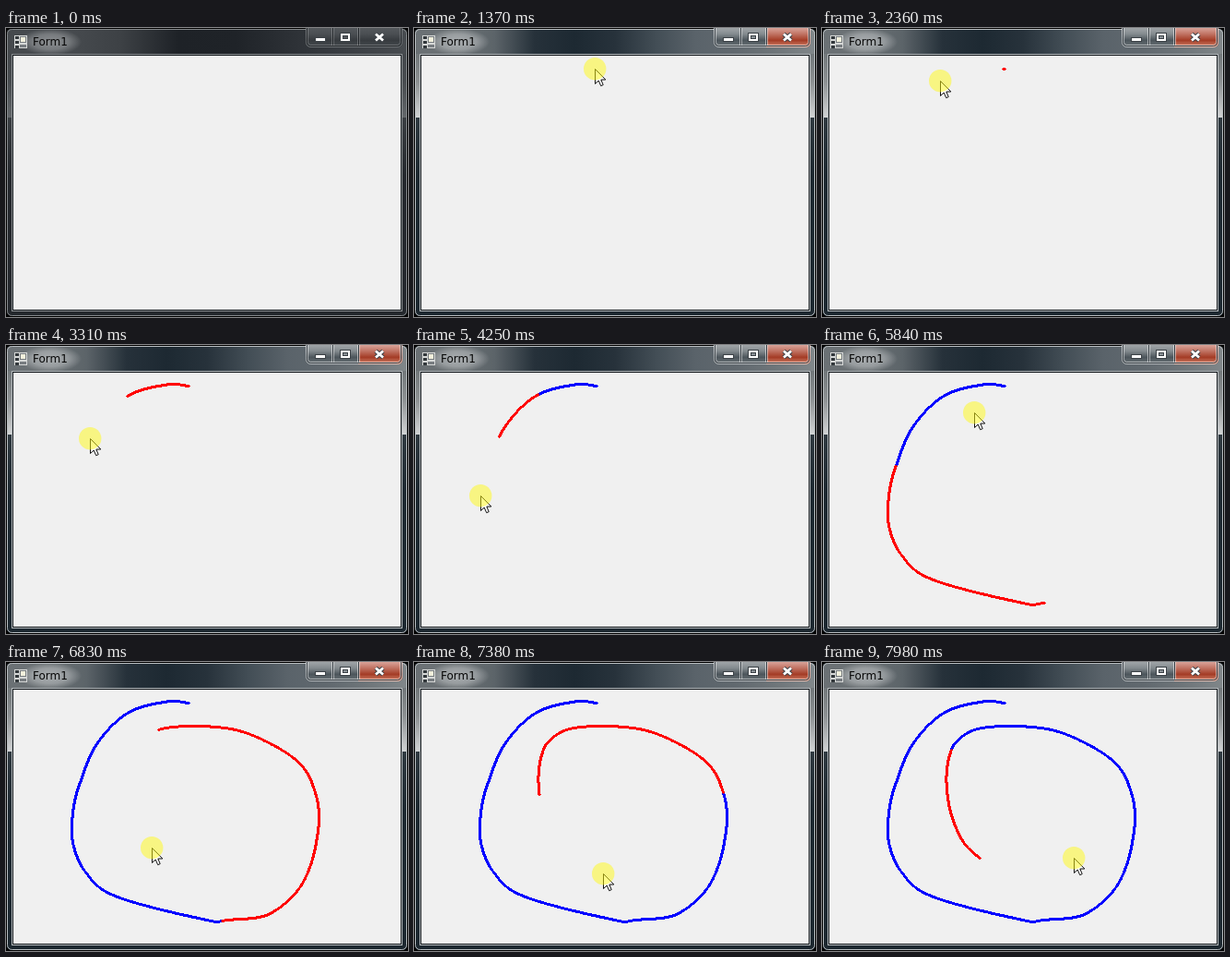
An HTML page with a canvas for the animation above (8 s loop, 436 by 313 pixels).

```html
<!DOCTYPE html>
<html lang="en">
<head>
<meta charset="utf-8">
<title>Form1</title>
<style>
html, body { margin: 0; width: 100%; height: 100%; overflow: hidden; background: #000; }
canvas { display: block; width: 436px; height: 313px; }
</style>
</head>
<body>
<canvas id="stage" width="436" height="313"></canvas>
<script>
const W = 436, H = 313, LOOP = 8000;
const ENTER = 120, SETTLE = 680, PRESS = 1140;
const RED_DELAY = 990, BLUE_DELAY = 2000;
const ctx = document.getElementById('stage').getContext('2d');

// Key points of the mouse drag: time, x, y
const keys = [
  [1340, 198, 44], [1650, 177, 42], [2280, 133, 54], [3020, 99, 87],
  [3840, 80, 130], [4250, 72, 163], [4370, 72, 195], [4480, 85, 226],
  [4620, 118, 253], [4800, 222, 280], [4850, 240, 279], [4920, 284, 273],
  [5020, 320, 241], [5220, 338, 182], [5400, 334, 138], [5550, 312, 104],
  [5660, 259, 76], [5750, 210, 69], [5840, 165, 73], [5980, 140, 94],
  [6470, 137, 153], [6830, 158, 201], [7500, 217, 231], [7980, 273, 212]
];
const last = keys.length - 1;

function slope(i, axis) {
  const a = keys[Math.max(0, i - 1)], b = keys[Math.min(last, i + 1)];
  return (b[axis] - a[axis]) / (b[0] - a[0]);
}

// Cubic Hermite through the key points
function dragAt(t) {
  t = Math.min(Math.max(t, keys[0][0]), keys[last][0]);
  let i = 0;
  while (keys[i + 1][0] < t) i++;
  const a = keys[i], b = keys[i + 1], d = b[0] - a[0], u = (t - a[0]) / d;
  const u2 = u * u, u3 = u2 * u, mix = 3 * u2 - 2 * u3;
  return [1, 2].map(k =>
    a[k] + (b[k] - a[k]) * mix +
    d * ((u3 - 2 * u2 + u) * slope(i, k) + (u3 - u2) * slope(i + 1, k)));
}

function cursorAt(t) {
  if (t >= PRESS) return dragAt(t);
  const u = Math.min(1, (t - ENTER) / (SETTLE - ENTER));
  const e = u * (2 - u);
  return [349 - 149 * e, 303 - 259 * e];
}

// Distinct pixels visited by the drag, with their times
const trail = [];
for (let t = keys[0][0]; t <= LOOP - RED_DELAY; t++) {
  const [x, y] = dragAt(t).map(Math.round), p = trail[trail.length - 1];
  if (!p || p.x !== x || p.y !== y) trail.push({ t, x, y });
}

// Evenly spaced colours along a line
function gradient(c, x0, y0, x1, y1, ...colors) {
  const g = c.createLinearGradient(x0, y0, x1, y1);
  colors.forEach((color, i) => g.addColorStop(i / (colors.length - 1), color));
  return g;
}

function roundRect(c, x, y, w, h, r) {
  c.beginPath();
  c.roundRect(x, y, w, h, r);
}

function drawGlass(c, active) {
  const base = active ? '#1d2830' : '#24282d';
  c.fillStyle = base;
  c.fillRect(1, 1, W - 2, H - 2);

  c.fillStyle = active
    ? gradient(c, 0, 0, W, 0, '#6a7074', '#6c7275', '#5c6469', '#26313a', '#1d2932',
      '#27323b', '#424d55', '#5a636a', '#61696f', '#6f767a', '#81878a')
    : gradient(c, 0, 0, W, 0, '#45494d', '#484c50', '#3d4145', '#1e2227', '#1f2328',
      '#2d3136', '#3b3f44', '#484c50');
  c.fillRect(1, 1, W - 2, 28);

  const upper = active
    ? gradient(c, 0, 20, 0, 97, '#6b7174', '#8d9193', '#d2d4d5')
    : gradient(c, 0, 20, 0, 97, '#43474b', '#484c50', '#64686b');
  const lower = gradient(c, 0, 97, 0, 160, active ? '#303a41' : '#3b3f43', base);
  for (const x of [1, 429]) {
    c.fillStyle = upper;
    c.fillRect(x, 28, 6, 69);
    c.fillStyle = lower;
    c.fillRect(x, 97, 6, 63);
  }

  // Soft glow behind the title
  c.save();
  c.translate(48, 15);
  c.scale(1, .42);
  const glow = c.createRadialGradient(0, 0, 6, 0, 0, 34);
  const tint = active ? '205,208,210' : '175,178,180';
  [.6, .45, 0].forEach((alpha, i) => glow.addColorStop(i / 2, `rgba(${tint},${alpha})`));
  c.fillStyle = glow;
  c.fillRect(-40, -32, 80, 64);
  c.restore();
}

function drawIcon(c) {
  c.fillStyle = '#d5d7d6';
  c.fillRect(9, 8, 14, 14);
  c.fillStyle = '#33383c';
  for (const y of [9, 14, 19]) c.fillRect(10, y, 4, 3);
  c.fillStyle = '#777c80';
  c.fillRect(15, 9, 7, 7);
  c.fillRect(15, 18, 7, 3);
  c.fillStyle = '#f3f0dc';
  c.fillRect(16, 10, 5, 5);
}

function drawButtons(c, active) {
  const dark = active ? '#343c42' : '#1f2327';
  const light = active ? 'rgba(255,255,255,.5)' : 'rgba(255,255,255,.22)';
  c.save();
  roundRect(c, 325, -4, 105, 25, 5);
  c.clip();
  c.fillStyle = active
    ? gradient(c, 0, 0, 0, 20, '#a0a5a8', '#838a8e', '#4c555b', '#6b7378')
    : gradient(c, 0, 0, 0, 20, '#54585c', '#4a4e52', '#373b3f', '#454a4e');
  c.fillRect(325, 0, 57, 21);
  if (active) c.fillStyle = gradient(c, 0, 0, 0, 20, '#d9a399', '#c07262', '#a43c26', '#cf8068');
  c.fillRect(382, 0, 48, 21);
  for (const x of [354, 382]) {
    c.fillStyle = light;
    c.fillRect(x - 1, 0, 3, 20);
    c.fillStyle = dark;
    c.fillRect(x, 0, 1, 20);
  }
  c.restore();

  // Nested rims: light, dark, light
  c.lineWidth = 1;
  [light, dark, light].forEach((color, i) => {
    c.strokeStyle = color;
    roundRect(c, 325.5 + i, -4.5, 104 - 2 * i, 25 - i, 5 - i);
    c.stroke();
  });

  const ink = '#3c4247';
  c.fillStyle = ink;
  c.fillRect(335, 10, 12, 5);
  c.fillRect(362, 5, 12, 10);
  c.fillStyle = '#fff';
  c.fillRect(336, 11, 10, 3);
  c.fillRect(363, 6, 10, 8);
  c.fillStyle = ink;
  c.fillRect(365, 8, 6, 4);
  c.fillStyle = active ? '#8a9196' : '#55595d';
  c.fillRect(366, 9, 4, 2);

  for (const [color, width] of [[ink, 4.8], ['#fff', 2.8]]) {
    c.strokeStyle = color;
    c.lineWidth = width;
    c.beginPath();
    for (const s of [-1, 1]) {
      c.moveTo(405 - 4 * s, 6.5);
      c.lineTo(405 + 4 * s, 13.5);
    }
    c.stroke();
  }
}

function makeWindow(active) {
  const layer = document.createElement('canvas');
  layer.width = W;
  layer.height = H;
  const c = layer.getContext('2d');
  c.fillStyle = '#000';
  c.fillRect(0, 0, W, H);
  c.save();
  roundRect(c, 0.5, 0.5, W - 1, H - 1, 6);
  c.clip();
  drawGlass(c, active);
  c.restore();

  c.lineWidth = 1;
  c.strokeStyle = active ? '#b9bec1' : '#85898c';
  roundRect(c, 1.5, 1.5, W - 3, H - 3, 5);
  c.stroke();
  c.strokeStyle = active ? '#b5babd' : '#8b8f92';
  c.strokeRect(6.5, 28.5, 423, 278);
  c.strokeStyle = '#14191d';
  c.strokeRect(7.5, 29.5, 421, 276);
  c.fillStyle = '#f0f0f0';
  c.fillRect(8, 30, 420, 275);

  drawIcon(c);
  c.fillStyle = '#080808';
  c.font = '12px "DejaVu Sans", sans-serif';
  c.fillText('Form1', 29, 19);
  drawButtons(c, active);
  return layer;
}

const idleWindow = makeWindow(false), activeWindow = makeWindow(true);

function drawTrail(t) {
  for (const p of trail) {
    if (p.t > t - RED_DELAY) break;
    ctx.fillStyle = p.t > t - BLUE_DELAY ? '#f00' : '#00f';
    ctx.fillRect(p.x - 1, p.y, 3, 1);
    ctx.fillRect(p.x, p.y - 1, 1, 3);
  }
}

const arrow = new Path2D('M.5 .5V16.5L4.2 13L6.7 18.7L9.2 17.6L6.8 12H11.8Z');

function drawCursor(t) {
  const [x, y] = cursorAt(t).map(Math.round);
  ctx.save();
  ctx.translate(x, y);
  ctx.fillStyle = '#fff';
  ctx.fill(arrow);
  ctx.strokeStyle = '#111';
  ctx.lineWidth = 1;
  ctx.stroke(arrow);
  if (t >= PRESS) {
    // The highlight tints the arrow too
    ctx.fillStyle = 'rgba(255,250,20,.5)';
    ctx.beginPath();
    ctx.arc(.2, .2, 12.2, 0, 2 * Math.PI);
    ctx.fill();
  }
  ctx.restore();
}

function draw(t) {
  ctx.drawImage(t < PRESS ? idleWindow : activeWindow, 0, 0);
  drawTrail(t);
  if (t >= ENTER) drawCursor(t);
}

const start = performance.now();
function tick() {
  draw((performance.now() - start) % LOOP);
  requestAnimationFrame(tick);
}
tick();
</script>
</body>
</html>
```
